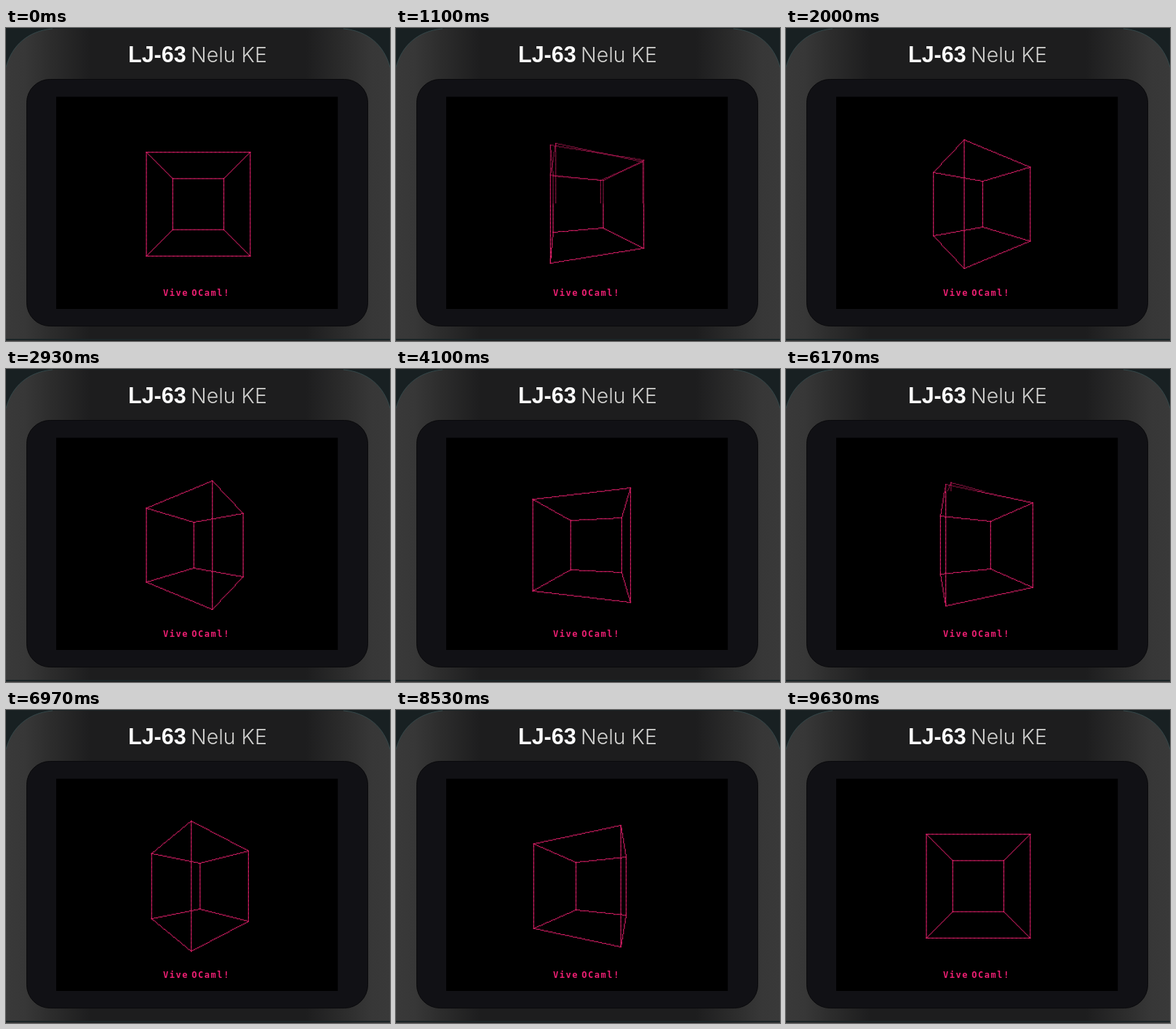
An HTML page with a canvas that plays this animation: 528 by 430 pixels, repeating every 9.66 s.

```html
<!DOCTYPE html>
<html lang="en">
<head>
<meta charset="utf-8">
<title>Rotating cube on a calculator</title>
<style>
  html, body { margin: 0; width: 100%; height: 100%; overflow: hidden; background: #182022; }
  svg, canvas { position: absolute; left: 0; top: 0; width: 528px; height: 430px; }
  .model { font: bold 30.5px "Liberation Sans", Arial, sans-serif; fill: #fafafa; }
  .series { font: 300 28.5px Inter, sans-serif; fill: #d2d2d0; }
  .message { font: bold 12px "DejaVu Sans Mono", monospace; letter-spacing: 1.55px; word-spacing: -4.6px; fill: #ec1f72; }
</style>
</head>
<body>
<svg viewBox="0 0 528 430">
  <defs>
    <linearGradient id="body">
      <stop offset="0" stop-color="#393939"/>
      <stop offset=".05" stop-color="#373737"/>
      <stop offset=".12" stop-color="#2c2c2c"/>
      <stop offset=".22" stop-color="#1d1d1e"/>
      <stop offset=".78" stop-color="#1d1d1e"/>
      <stop offset=".88" stop-color="#2c2c2c"/>
      <stop offset=".95" stop-color="#373737"/>
      <stop offset="1" stop-color="#393939"/>
    </linearGradient>
  </defs>
  <rect width="528" height="430" fill="#182022"/>
  <path d="M0 430V54C8 24 30 4 64 1H464C498 4 520 24 528 54V430Z" fill="url(#body)"/>
  <path d="M0 54C8 24 30 4 64 1M464 1C498 4 520 24 528 54" fill="none" stroke="#35484a"/>
  <path d="M0 428H528" stroke="#1b2527" stroke-width="2"/>
  <rect x="28.5" y="70.5" width="469" height="339" rx="32" fill="#111115" stroke="#0a0a0c"/>
  <rect x="69" y="94.5" width="387.2" height="291.5"/>
  <text class="model" x="168" y="47">LJ-63</text>
  <text class="series" x="254" y="47">Nelu KE</text>
  <text class="message" x="216" y="368">Vive OCaml!</text>
</svg>
<canvas width="528" height="430"></canvas>
<script>
const LOOP = 9660, FRAMES = 290;
const STEP_FRAMES = 7.25, STEP_LEAD = 2.75, STEP_ANGLE = Math.PI / 40;
const SCREEN = { x: 69, y: 95, height: 291, dot: 1.21 };
const CENTER = { x: 161, y: 121 }, FOCAL = 118.2, DISTANCE = 3;
const ctx = document.querySelector("canvas").getContext("2d");

function line([x0, y0], [x1, y1]) {
  const count = Math.max(Math.abs(x1 - x0), Math.abs(y1 - y0), 1);
  const { x, y, dot } = SCREEN;
  for (let i = 0; i <= count; i++) {
    const px = Math.round(x0 + (x1 - x0) * i / count);
    const py = Math.round(y0 + (y1 - y0) * i / count);
    ctx.fillRect(x + px * dot, y + py * dot, dot, dot);
  }
}

function project(angle, height) {
  const scale = FOCAL / (DISTANCE - Math.SQRT2 * Math.cos(angle));
  return [
    CENTER.x + Math.trunc(scale * Math.SQRT2 * Math.sin(angle)),
    CENTER.y + Math.trunc(scale * height)
  ];
}

function drawCube(step) {
  for (let i = 0; i < 4; i++) {
    const angle = step * STEP_ANGLE + (i - 0.5) * Math.PI / 2;
    const next = angle + Math.PI / 2;
    line(project(angle, -1), project(next, -1));
    line(project(angle, 1), project(next, 1));
    line(project(angle, -1), project(angle, 1));
  }
}

function drawBand(top, bottom, alpha, ...steps) {
  ctx.save();
  ctx.beginPath();
  ctx.rect(0, top, 528, bottom - top);
  ctx.clip();
  ctx.globalAlpha = alpha;
  steps.forEach(drawCube);
  ctx.restore();
}

function render(now) {
  const frame = Math.floor((now % LOOP) / LOOP * FRAMES + 0.3) % FRAMES;
  const step = Math.floor((frame + STEP_LEAD) / STEP_FRAMES);
  const next = Math.floor((frame + 1 + STEP_LEAD) / STEP_FRAMES);
  ctx.clearRect(0, 0, 528, 430);
  ctx.fillStyle = "#e0206a";
  if (next > step) {
    // the display refreshes from the top, so both poses show above the scan line
    const share = frame + 1 - (next * STEP_FRAMES - STEP_LEAD);
    const scan = Math.round(SCREEN.y + share * SCREEN.height);
    drawBand(0, scan, 0.6, step, next);
    drawBand(scan, 430, 1, step);
  } else {
    drawCube(step);
  }
}

const start = performance.now();
function tick() {
  render(performance.now() - start);
  requestAnimationFrame(tick);
}
tick();
</script>
</body>
</html>
```
